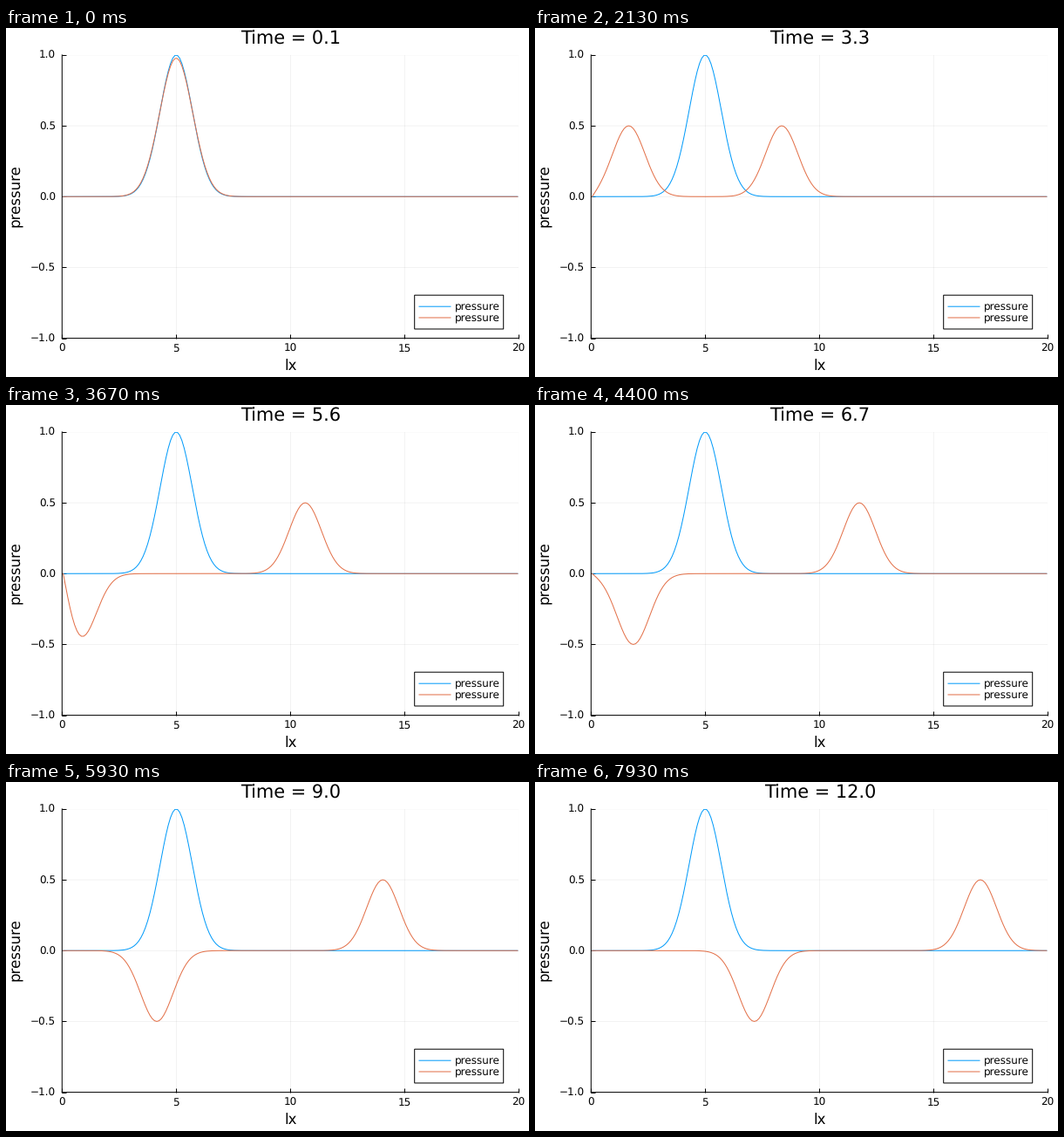
A matplotlib script for the animation above (8000 ms loop, 600 by 400 pixels).

```python
import numpy as np
import matplotlib.pyplot as plt
from matplotlib.animation import FuncAnimation
from matplotlib.lines import Line2D
from matplotlib.patches import Rectangle

W, H, DPI = 600, 400, 100
PX = 72 / DPI                       # one pixel in points
LEFT, RIGHT, TOP, BOTTOM = 64.3, 588.2, 30.9, 355.6
BLUE, ORANGE = "#009AFA", "#E36F47"
LOOP, TICK = 8000, 20               # ms
STEP = LOOP / 120                   # ms per simulation step
DX = 0.1

plt.rcParams.update({"font.family": "DejaVu Sans", "path.snap": False,
                     "text.hinting": "none"})
fig = plt.figure(figsize=(W / DPI, H / DPI), dpi=DPI, facecolor="white")


def text(x, y, s, size, **kw):
    """Text with its baseline at pixel (x, y), y pointing down."""
    kw = {"ha": "center", "va": "baseline", **kw}
    return fig.text(x / W, 1 - y / H, s, fontsize=size * PX, color="black", **kw)


def segment(x0, x1, y, color):
    fig.add_artist(Line2D([x0 / W, x1 / W], [1 - y / H] * 2,
                          color=color, lw=PX, zorder=6))


ax = fig.add_axes([LEFT / W, 1 - BOTTOM / H, (RIGHT - LEFT) / W, (BOTTOM - TOP) / H])
ax.set(xlim=(0, 20), ylim=(-1, 1))
ax.patch.set_visible(False)
x_ticks = np.arange(0, 21, 5)
y_ticks = np.linspace(-1, 1, 5)
ax.set_xticks(x_ticks)
ax.set_yticks(y_ticks)
ax.tick_params(direction="in", length=5 * PX, width=PX, color="black",
               labelbottom=False, labelleft=False)
ax.set_axisbelow(True)
ax.grid(color="black", alpha=0.1, lw=0.5 * PX)
for side, spine in ax.spines.items():
    spine.set_visible(side in ("left", "bottom"))
    spine.set_linewidth(PX)

for v in x_ticks:
    text(LEFT + (RIGHT - LEFT) * v / 20, 371, str(v), 12)
for v in y_ticks:
    y = BOTTOM - (BOTTOM - TOP) * (v + 1) / 2
    text(57, y + 4.4, f"{v:.1f}".replace("-", "\u2212"), 12, ha="right")
text(326.3, 392, "lx", 16.6)
text(16.3, 192.6, "pressure", 16.6, rotation=90, rotation_mode="anchor")
title = text(326.8, 18.3, "", 20.9)

# Legend
fig.add_artist(Rectangle((468.7 / W, 1 - 345 / H), 102 / W, 38.8 / H,
                         fc="white", ec="black", lw=PX, zorder=5))
for y, color in ((319.2, BLUE), (332, ORANGE)):
    segment(474, 510, y, color)
    text(514.7, y + 4.1, "pressure", 12, ha="left", zorder=7)

# Cell centres; the wall at the first cell flips the reflected pulse.
x = np.arange(DX / 2, 20, DX)
wall = x[0]


def pulse(centre):
    return np.exp(-(x - centre) ** 2)


ax.plot(x, pulse(5), color=BLUE, lw=PX, zorder=3)
wave, = ax.plot([], [], color=ORANGE, lw=PX, zorder=4)


def update(i):
    step = int((i + 0.75) * TICK / STEP)
    t = (step + 1) / 10
    d = t + DX / 2
    wave.set_data(x, 0.5 * (pulse(5 + d) + pulse(5 - d) - pulse(2 * wall - 5 + d)))
    title.set_text(f"Time = {t:.1f}")
    return wave, title


anim = FuncAnimation(fig, update, frames=LOOP // TICK, interval=TICK,
                     repeat=True, repeat_delay=0)
plt.show()
```
